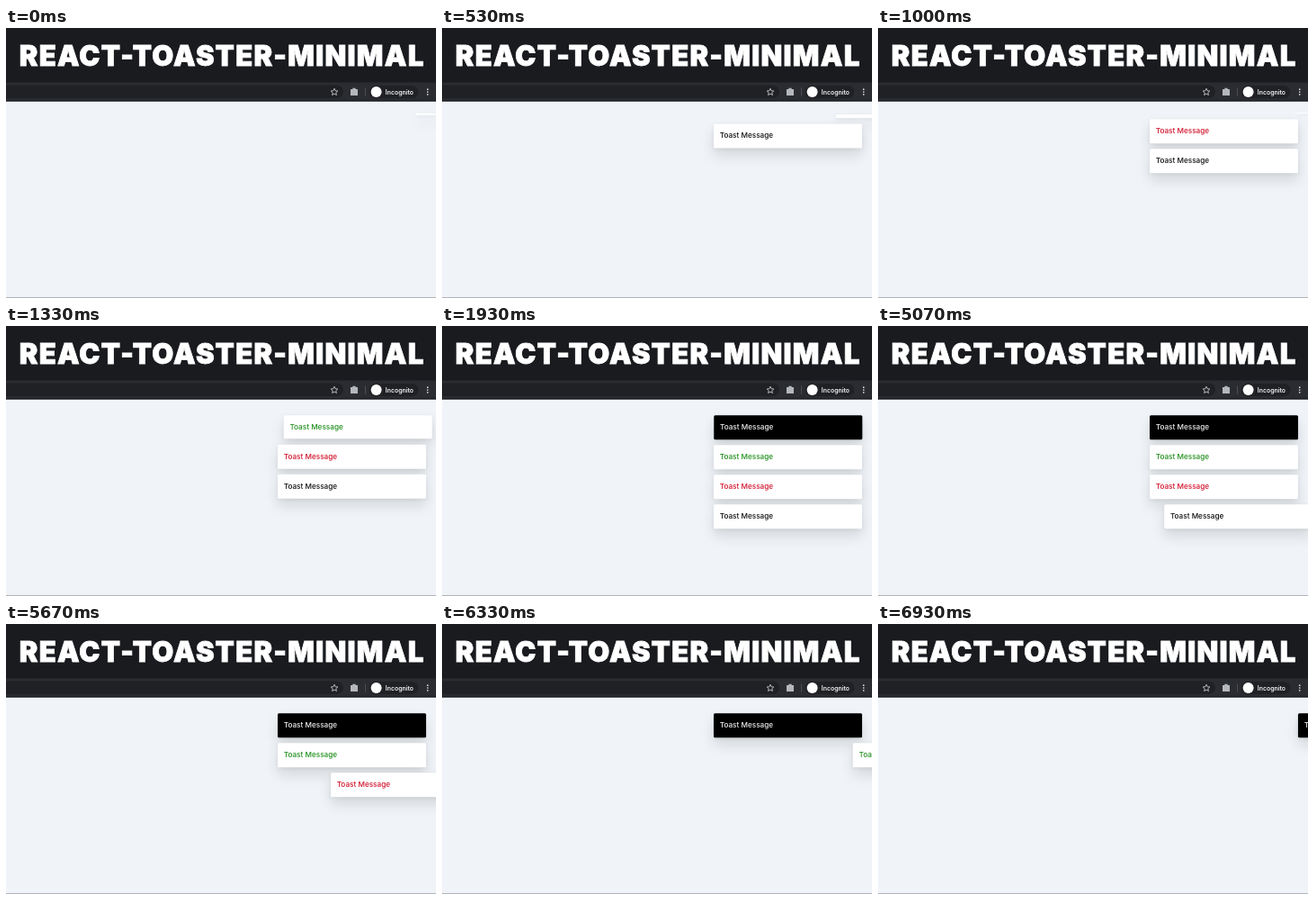
Recreate the animation shown at these times as an HTML page. Size 478 by 300 pixels, loop 6.99 s.

```html
<!DOCTYPE html>
<html lang="en">
<head>
<meta charset="utf-8">
<title>Toaster demo</title>
<style>
  html, body { margin: 0; width: 100%; height: 100%; overflow: hidden; background: #f0f4f8; }
  #stage { position: absolute; left: 0; top: 0; width: 478px; height: 300px; overflow: hidden; }
  svg { position: absolute; left: 0; top: 0; display: block; }
  text { font-family: Inter, "Open Sans", sans-serif; }
  .toast {
    position: absolute; left: 0; top: 0; width: 164.5px; overflow: hidden;
    border-radius: 1.5px; background: #fff;
    box-shadow: 0 8px 15px rgba(0, 0, 0, .12), 0 1px 4px rgba(0, 0, 0, .07);
    font: 450 8.2px/26.8px Inter, "Open Sans", sans-serif; text-indent: 6.7px; white-space: nowrap;
  }
</style>
</head>
<body>
<div id="stage">
  <svg width="478" height="300" viewBox="0 0 478 300">
    <rect width="478" height="300" fill="#f0f4f8"/>
    <rect y="299" width="478" height="1" fill="#b0b3b7"/>
    <rect width="478" height="61" fill="#191b1f"/>
    <text x="240.1" y="42" text-anchor="middle" font-size="31" font-weight="900" letter-spacing="1.25" fill="#fff" stroke="#fff" stroke-width=".8">REACT<tspan dy="-1.5">-</tspan><tspan dy="1.5">TOASTER</tspan><tspan dy="-1.5">-</tspan><tspan dy="1.5">MINIMAL</tspan></text>
    <rect y="60.5" width="478" height="21" fill="#2b2c31"/>
    <rect y="80" width="478" height="1.5" fill="#1f2024"/>
    <rect x="-20" y="63.5" width="395" height="14.5" rx="7.2" fill="#202125"/>
    <path d="M365 67.2l1.1 2.5 2.7.3-2 1.8.6 2.7-2.4-1.4-2.4 1.4.6-2.7-2-1.8 2.7-.3z" fill="none" stroke="#d5d7da" stroke-width=".8"/>
    <path d="M383 68h2.3v-1.3h3.4V68h2.3v7h-8z" fill="#b4b7bb"/>
    <path d="M399.5 66.5v9" stroke="#55575c" stroke-width=".8"/>
    <rect x="403.5" y="64" width="55" height="14" rx="7" fill="#202125"/>
    <circle cx="411.6" cy="71" r="6" fill="#fff"/>
    <text x="421.8" y="73.6" font-size="6.9" font-weight="600" fill="#f1f3f4">Incognito</text>
    <g fill="#e2e4e7">
      <circle cx="468.7" cy="68.2" r=".85"/>
      <circle cx="468.7" cy="71" r=".85"/>
      <circle cx="468.7" cy="73.8" r=".85"/>
    </g>
  </svg>
</div>
<script>
const LOOP = 6990, SLIDE = 500, GROW = 450, GROW_DELAY = 20;
const LEFT = 302, TRAVEL = 176, TOP = 93, GAP = 6.2, HEIGHT = 26.8;

const toasts = [
  { enter: -125, leave: 4965, color: '#111' },
  { enter: 365, leave: 5470, color: '#d0142c' },
  { enter: 900, leave: 5952, color: '#218f1d' },
  { enter: 1445, leave: 6519, color: '#eee', back: '#000' }
];

// Newest toast comes first in the stack.
const stage = document.getElementById('stage');
for (const toast of [...toasts].reverse()) {
  const el = toast.el = document.createElement('div');
  el.className = 'toast';
  el.textContent = 'Toast Message';
  el.style.color = toast.color;
  if (toast.back) el.style.background = toast.back;
  stage.append(el);
}

// cubic-bezier(.42, 0, .58, 1)
function easeInOut(x) {
  if (x <= 0) return 0;
  if (x >= 1) return 1;
  let low = 0, high = 1, s;
  for (let i = 0; i < 20; i++) {
    s = (low + high) / 2;
    const bx = 1.26 * s * (1 - s) ** 2 + 1.74 * s * s * (1 - s) + s ** 3;
    if (bx < x) low = s; else high = s;
  }
  return s * s * (3 - 2 * s);
}

function render(time) {
  let bottom = TOP;
  for (let i = toasts.length - 1; i >= 0; i--) {
    const { enter, leave, el } = toasts[i];
    const shown = easeInOut((time - enter) / SLIDE);
    const grown = easeInOut((time - enter - GROW_DELAY) / GROW);
    const gone = easeInOut((time - leave) / SLIDE);
    const height = HEIGHT * grown ** 1.2;
    bottom += (GAP + HEIGHT) * grown;
    const x = LEFT + TRAVEL * (1 - shown + gone);
    el.style.display = grown > 0 && gone < 1 ? 'block' : 'none';
    el.style.height = height + 'px';
    el.style.transform = `translate(${x}px, ${bottom - height}px)`;
  }
}

const start = performance.now();
function tick() {
  render((performance.now() - start) % LOOP);
  requestAnimationFrame(tick);
}
tick();
</script>
</body>
</html>
```
